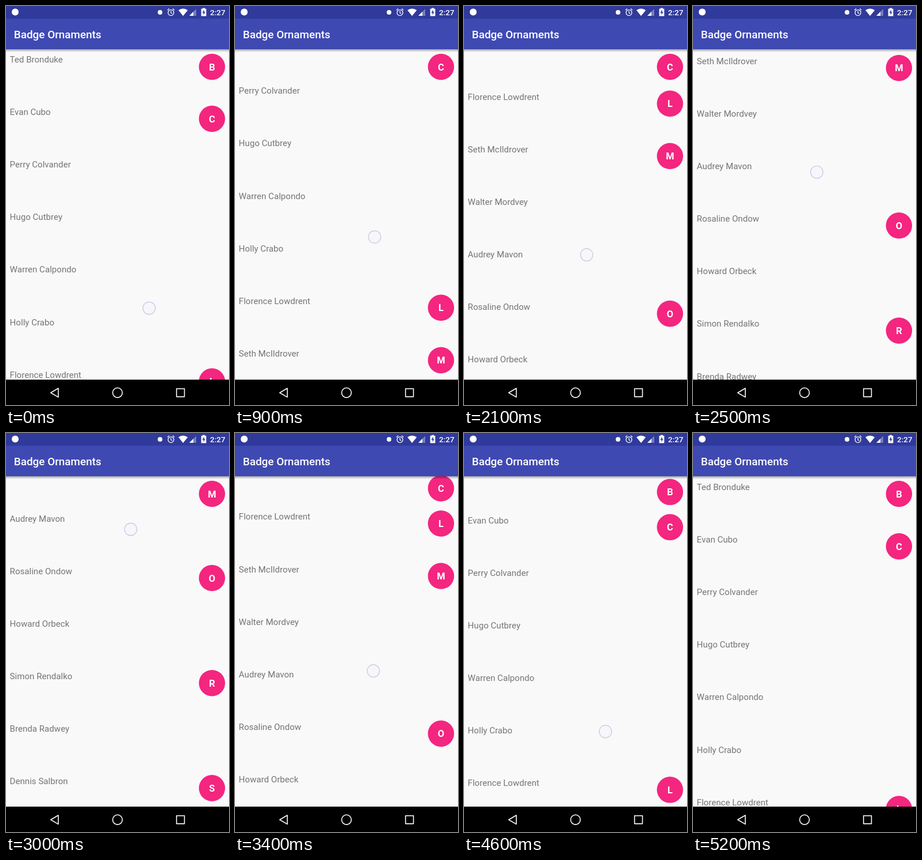
Write an HTML page that moves like this. It is 388 px wide and 692 px high and loops after 5500 ms.

```html
<!DOCTYPE html>
<html lang="en">
<head>
<meta charset="utf-8">
<title>Sticky letter list</title>
<style>
  html, body { margin: 0; width: 100%; height: 100%; overflow: hidden; background: #f9f9f9; }
  svg { display: block; width: 100%; height: 100%; font-family: Roboto, sans-serif; }
  .name { font-size: 15.1px; fill: #757575; }
  .letter { font-size: 16.5px; font-weight: 700; fill: #fff; text-anchor: middle; }
  .title { font-size: 18.9px; font-weight: 500; fill: #fff; }
  .clock { font-size: 13.4px; font-weight: 500; fill: #fff; text-anchor: end; }
</style>
</head>
<body>
<svg viewBox="0 0 388 692">
  <defs>
    <linearGradient id="shade" x2="0" y2="1">
      <stop offset="0" stop-color="#000" stop-opacity=".34"/>
      <stop offset="1" stop-color="#000" stop-opacity="0"/>
    </linearGradient>
  </defs>
  <rect width="388" height="692" fill="#f9f9f9"/>
  <g id="list"></g>
  <g id="badges"></g>
  <path id="glow" fill="#3f49b2"/>

  <rect y="75" width="388" height="5" fill="url(#shade)"/>
  <rect y="21" width="388" height="54" fill="#3f49b2"/>
  <rect width="388" height="22" fill="#303a9b"/>
  <text class="title" x="13.8" y="55.8">Badge Ornaments</text>

  <g fill="#fff">
    <circle cx="16" cy="10.5" r="6"/>
    <circle cx="268" cy="11" r="4"/>
    <path d="M300 7.2Q308 1.6 316.3 7.2L308.1 17.2Z"/>
    <path d="M331 5V17H319Z" opacity=".35"/>
    <path d="M326 10V17H319Z"/>
    <path d="M342 4.8V3.6H346V4.8H348.4V17.4H339.6V4.8Z"/>
    <path d="M344.8 6.6L341.4 11.8H343.6V15.6L346.8 10.4H344.8Z" fill="#303a9b"/>
    <text class="clock" x="381.5" y="16">2:27</text>
  </g>
  <g fill="none" stroke="#fff" stroke-width="1.3">
    <circle cx="287" cy="11.6" r="5"/>
    <path d="M287 8.6V11.8L289.3 13.2M280.9 7.2L284 4.6M293.1 7.2L290 4.6"/>
  </g>

  <rect y="648" width="388" height="44" fill="#000"/>
  <g fill="none" stroke="#fff" stroke-width="1.6" stroke-linejoin="round">
    <path d="M91 663V678.4L77.8 670.7Z"/>
    <circle cx="194" cy="670.7" r="8.4"/>
    <rect x="296.7" y="663.8" width="13.8" height="13.8"/>
  </g>
  <circle id="touch" r="10.8" fill="#f6f3fb" fill-opacity=".5" stroke="#cfcce8" stroke-width="1.4"/>
</svg>
<script>
const LOOP = 5500, STEP = 100, LAST = 5200;
const PITCH = 91.1, TEXT_Y = 99, PIN_Y = 105.5, HEADER = 61;

const names = [
  'Ted Bronduke', 'Evan Cubo', 'Perry Colvander', 'Hugo Cutbrey', 'Warren Calpondo',
  'Holly Crabo', 'Florence Lowdrent', 'Seth McIldrover', 'Walter Mordvey', 'Audrey Mavon',
  'Rosaline Ondow', 'Howard Orbeck', 'Simon Rendalko', 'Brenda Radwey', 'Dennis Salbron'
];

// Finger strokes: each carries the list between two scroll offsets.
// "skew" above 1 delays the start; the finger is half faded at "lift".
const strokes = [
  { from: 0, to: 1600, lift: 1600, x: [249, 228], y: [524, 96], scroll: [1, 444], skew: 1.8 },
  { from: 1850, to: 3000, lift: 3200, x: [213, 217], y: [468, 167], scroll: [444, 765], skew: 1 },
  { from: 3000, to: 3700, lift: 3900, x: [217, 256], y: [167, 572], scroll: [765, 320], skew: 1 },
  { from: 4200, to: 4700, lift: 4700, x: [238, 247], y: [240, 550], scroll: [320, 0], skew: 1 }
];

const byId = id => document.getElementById(id);
const clamp = v => Math.min(Math.max(v, 0), 1);
const mix = ([a, b], k) => a + (b - a) * k;
const smooth = u => u * u * (3 - 2 * u);

function add(parent, tag, attrs, text = '') {
  const el = document.createElementNS('http://www.w3.org/2000/svg', tag);
  set(el, attrs);
  el.textContent = text;
  return parent.appendChild(el);
}

function set(el, attrs) {
  for (const k in attrs) el.setAttribute(k, attrs[k]);
}

const moveY = (el, y) => set(el, { transform: `translate(0 ${y.toFixed(2)})` });

names.forEach((name, i) =>
  add(byId('list'), 'text', { class: 'name', x: 6.6, y: TEXT_Y + i * PITCH }, name));

const sections = [];
names.forEach((name, row) => {
  const letter = name.split(' ')[1][0];
  if (sections.length && sections[sections.length - 1].letter === letter) return;
  const el = add(byId('badges'), 'g', {});
  add(el, 'circle', { cx: 358.4, cy: 0, r: 22.8, fill: '#f4267f' });
  add(el, 'text', { class: 'letter', x: 358.4, y: 6 }, letter);
  sections.push({ letter, row, el });
});

function drawList(scroll) {
  moveY(byId('list'), -scroll);
  // A pinned badge is pushed away by the next section
  const restY = s => PIN_Y + s.row * PITCH - scroll;
  sections.forEach((s, i) => {
    const next = sections[i + 1];
    const limit = next ? restY(next) - HEADER : Infinity;
    moveY(s.el, Math.min(Math.max(PIN_Y, restY(s)), limit));
  });
}

// Overscroll glow after the list hits its top
function drawGlow(t) {
  const k = Math.sin(Math.PI * clamp((t - 4600) / 600));
  set(byId('glow'), { d: `M0 75Q194 ${75 + 110 * k} 388 75Z`, opacity: .2 * k });
}

function draw(t) {
  const s = strokes.filter(s => s.from <= t).pop();
  const k = smooth(clamp((t - s.from) / (s.to - s.from)) ** s.skew);
  drawList(mix(s.scroll, k));
  set(byId('touch'), {
    cx: mix(s.x, k),
    cy: mix(s.y, k),
    opacity: clamp((s.lift + 100 - t) / 200)
  });
  drawGlow(t);
}

const start = performance.now();
function tick() {
  const t = (performance.now() - start) % LOOP;
  draw(Math.min(Math.floor(t / STEP) * STEP, LAST));
  requestAnimationFrame(tick);
}
tick();
</script>
</body>
</html>
```
